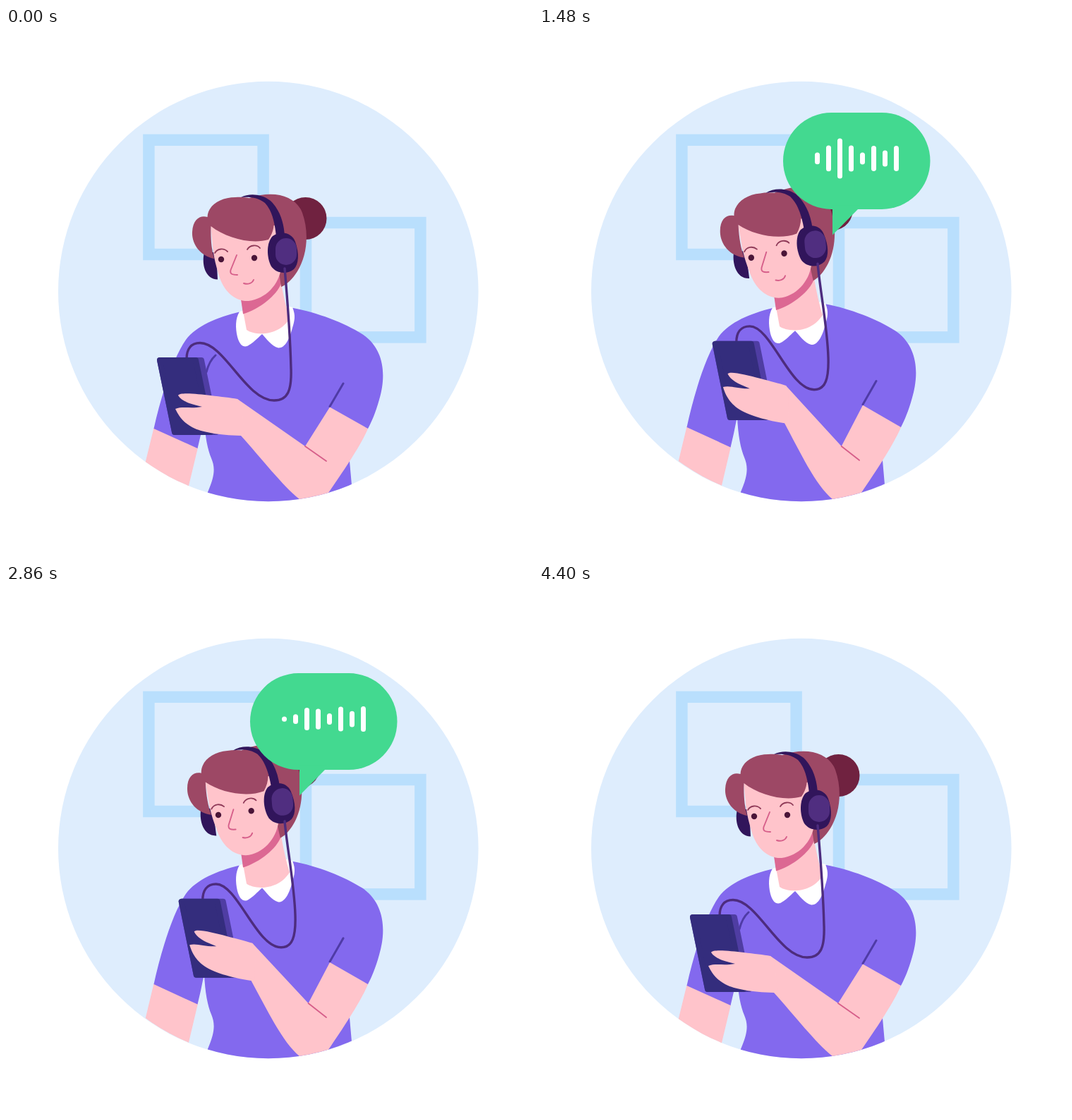
Write an HTML page that moves like this. It is 747 by 750 pixels and loops after 4.5 s.

```html
<!DOCTYPE html>
<html lang="en">
<head>
<meta charset="utf-8">
<title>Voice message</title>
<style>
  html, body { margin: 0; width: 100%; height: 100%; overflow: hidden; background: #fff; }
  svg { display: block; width: 100%; height: 100%; }
  .line { fill: none; stroke-linecap: round; stroke-linejoin: round; }
  .skin { fill: #ffc4cb; }
  .hair { fill: #9d4865; }
  .dark { fill: #31155b; }
  .shirt { fill: #8369ee; }
  .fold { stroke: #4f3ba6; stroke-width: 3; }
  .brow { stroke: #8f3a58; stroke-width: 1.8; }
  .pink { stroke: #d65f8a; stroke-width: 1.9; }
</style>
</head>
<body>
<svg viewBox="0 0 747 750">
  <defs>
    <clipPath id="disc"><circle cx="371.8" cy="373.5" r="297.8"/></clipPath>
  </defs>

  <circle cx="371.8" cy="373.5" r="297.8" fill="#deedfd"/>
  <g fill="none" stroke="#b9dffd" stroke-width="16.5">
    <rect x="202.4" y="158.8" width="162.2" height="162.2"/>
    <rect x="425" y="276" width="162.4" height="162.4"/>
  </g>

  <g id="figure" clip-path="url(#disc)">
    <path class="skin" d="M209.5 567L198 614L187 660L254 672L259 649L272 595Z"/>
    <path class="shirt" d="M331 402.5C300 410 270 422 255 442C236 469 219 525 209.5 568L271.5 596L276 577
      L281 553C282 580 286 598 291 610C296 622 297 633 286 658L284 690H491L490 648L487 614L484 580L500 575L513 568
      C518 559 524 545 529 527C540 490 535 454 505 434C480 418 440 403 407 397Z"/>
    <path class="line fold" d="M297 464Q288 472 284 488M478 504L459 536.5"/>

    <path fill="#fff" d="M331 402C325 412 325 425 328 438C331 449 336 453 342 451C350 447 356 440 363 434
      C369 440 376 451 386 453.5C396 454 402 440 406 425C409 415 411 408 406 396L380 390Z"/>
    <path class="skin" d="M332 380L341 428C352 436 386 438 402 412C398 400 393 380 389 355Z"/>
    <path fill="#dc6893" d="M333 384L336 405.5C360 398 384 379 390 362L388 342Z"/>

    <g id="head">
      <circle cx="424.5" cy="270" r="30" fill="#702240"/>
      <path class="hair" d="M345 241C380 229 411 238 420 262C430 290 427 322 413 345C406 356 398 364 390 367L386 340L340 285Z"/>
      <path class="dark" d="M281 318C277 335 282 356 300 356.5L298 318Z"/>
      <path class="skin" d="M290 278L293.5 315C295 327 298 338 301 348C308 374 325 388 344 387C368 384 387 364 390 340L385 280Z"/>
      <path class="hair" d="M285.5 268C286 252 303 240 325 240C347 238 368 246 378 266C382 277 379 290 372 300
        C348 307 312 298 290.5 281C290 300 291.5 314 295 327C275 323 263 306 264 289C265 271 275 265 285.5 268Z"/>
      <path class="dark" d="M333 240C345 234 362 235 375 245C388 258 394 275 395 296H383C381 275 377 259 367 248C358 240.5 346 239 333 240Z"/>
      <path class="dark" d="M378 295C390 287 405 290 410 303C416 320 415 335 408 342C398 350 383 348 376 338C369 325 369 304 378 295Z"/>
      <rect x="382" y="298" width="30" height="38" rx="15" fill="#502e80"/>
      <g fill="#4a1538"><circle cx="305" cy="328" r="4.2"/><circle cx="352" cy="326" r="4.2"/></g>
      <path class="line brow" d="M296 319C300 312 309 312 314 317M342 314C346 307 356 307 360 312"/>
      <path class="line pink" d="M327 322L318.5 343C317 349 321 350 328 350M337 362C343 364 349 362 351 357"/>
    </g>

    <path id="cable" class="line" stroke="#4d2c7e" stroke-width="3.4"/>
    <g id="phone" stroke-width="8" stroke-linejoin="round">
      <path fill="#4f3da3" stroke="#4f3da3" d="M218 471H277L298 573H239Z"/>
      <path fill="#342d7d" stroke="#342d7d" d="M218 471H269L290 573H239Z"/>
    </g>
    <path id="forearm" class="skin"/>
    <path id="hand" class="skin" d="M244 521C246 516 272 519 290 521C305 523 318 524 328 526L333 532L338 575L333 578
      C300 577 280 573 268 568C250 560 244 548 240 540C250 536 262 540 278 537C262 533 250 530 244 521Z"/>
    <path id="crease" class="line pink"/>
  </g>

  <g id="bubble">
    <rect x="-70" y="-173.5" width="208.5" height="137" rx="68.5" fill="#43d990"/>
    <path d="M0 0V-42H40L36 -36.5Z" fill="#43d990"/>
    <g id="bars" fill="#fff"></g>
  </g>
</svg>

<script>
const LOOP = 4500, UP = 750, DIP = 2350, UP_AGAIN = 3350, DOWN = 4400;
const $ = id => document.getElementById(id);
const [figure, head, cable, phone, forearm, hand, crease, bubble, bars] =
  ['figure', 'head', 'cable', 'phone', 'forearm', 'hand', 'crease', 'bubble', 'bars'].map($);

const mix = (a, b, k) => a + (b - a) * k;
const clamp = x => Math.min(1, Math.max(0, x));
const smooth = x => (1 - Math.cos(Math.PI * x)) / 2;
const ramp = (t, from, to) => clamp((t - from) / (to - from));

// Body rise: up, down, up, then a long settle.
function rise(t) {
  if (t < UP) return smooth(ramp(t, 0, UP));
  if (t < DIP) return 1 - smooth(ramp(t, UP, DIP));
  if (t < UP_AGAIN) return smooth(ramp(t, DIP, UP_AGAIN));
  return 1 - smooth(1 - (1 - ramp(t, UP_AGAIN, DOWN)) ** 2);
}

// The phone only drops halfway between the two rises.
const lift = t => t > UP && t < UP_AGAIN ? (1 + rise(t)) / 2 : rise(t);

function drawArm(p) {
  const dx = 28 * p, dy = -20 * p;
  const elbow = `${424 + 6 * p} ${593 + 2 * p}`;
  hand.setAttribute('transform', `translate(${dx} ${dy}) rotate(${10 * p} 328 526)`);
  forearm.setAttribute('d', `M${328 + dx} ${526 + dy}L${elbow}L459 537.5L513 568C505 588 480 626 457 659L450 680L416 668` +
    `C392 649 ${362 + 10 * p} ${610 - 10 * p} ${333 + 19 * p} ${578 + dy}Z`);
  crease.setAttribute('d', `M${elbow}L454 614`);
}

// From the earpad down to the lowest point, over the crest and into the phone.
function drawCable(p, px, py) {
  const q = clamp(2 * p);
  const low = { x: 380 + 10 * q, y: 528 - 3 * q - 32 * Math.max(0, p - .5) };
  const side = { x: 404 + 6 * q, y: low.y - 45 };
  const top = { x: px + 61 - 8 * q, y: py - 20.5 };
  const jack = px + 42 - 8 * q, span = low.x - top.x;
  cable.setAttribute('d', `M395 341C398 375 ${side.x - 1} ${side.y - 40} ${side.x} ${side.y}` +
    `C${side.x + 1} ${low.y - 15} ${side.x - 4} ${low.y} ${low.x} ${low.y}` +
    `C${low.x - .38 * span} ${low.y} ${top.x + .33 * span} ${top.y} ${top.x} ${top.y}` +
    `C${top.x - 13} ${top.y} ${jack} ${top.y + 9} ${jack} ${py + 2}`);
}

// Springs in with a decaying overshoot, backs out.
function bubbleScale(t) {
  if (t < 465) return ramp(t, 265, 465);
  if (t < 3920) {
    const x = t - 465;
    return 1 + .432 * Math.exp(-.0085 * x) * Math.sin(Math.PI * x / 270);
  }
  const u = ramp(t, 3920, 4290), back = 1.53;
  return Math.max(0, 1 - u * u * ((back + 1) * u - back));
}

const peak = i => i < 5 ? 57 - 20 * Math.abs(i - 2) : 23 + 13 * (i % 2);
const rects = Array.from({ length: 8 }, (_, i) => {
  const r = document.createElementNS('http://www.w3.org/2000/svg', 'rect');
  r.setAttribute('x', -25 + 16 * i);
  r.setAttribute('width', 7);
  r.setAttribute('rx', 3.5);
  return bars.appendChild(r);
});

// Uneven beats, each a dip that sweeps over the bars from right to left.
function drawBars(t) {
  rects.forEach((r, i) => {
    let open = 1;
    for (let k = 0; k < 7; k++) {
      const beat = 780 + 520 * k - 180 * Math.sin(2 * Math.PI * k / 3);
      open *= 1 - Math.exp(-(((t - beat - 140 + 31 * i) / 95) ** 2));
    }
    const h = mix(7, peak(i), open);
    r.setAttribute('y', -108.5 - h / 2);
    r.setAttribute('height', h);
  });
}

function draw(t) {
  const p = lift(t), dx = 40.5 * p, dy = -23.8 * p;
  figure.setAttribute('transform', `translate(0 671) scale(1 ${1 + .036 * rise(t)}) translate(0 -671)`);
  head.setAttribute('transform', `rotate(${-6 * p} 358 381)`);
  phone.setAttribute('transform', `translate(${dx} ${dy})`);
  drawCable(p, 214 + dx, 467 + dy);
  drawArm(p);

  const s = bubbleScale(t);
  const tip = 293.2 + 7.7 * Math.cos(2 * Math.PI * (t - 2390) / 3700);
  bubble.setAttribute('visibility', s > 0 ? 'visible' : 'hidden');
  bubble.setAttribute('transform', `translate(416 ${tip}) scale(${s})`);
  drawBars(t);
}

function tick() {
  draw(performance.now() % LOOP);
  requestAnimationFrame(tick);
}
draw(0);
requestAnimationFrame(tick);
</script>
</body>
</html>
```
